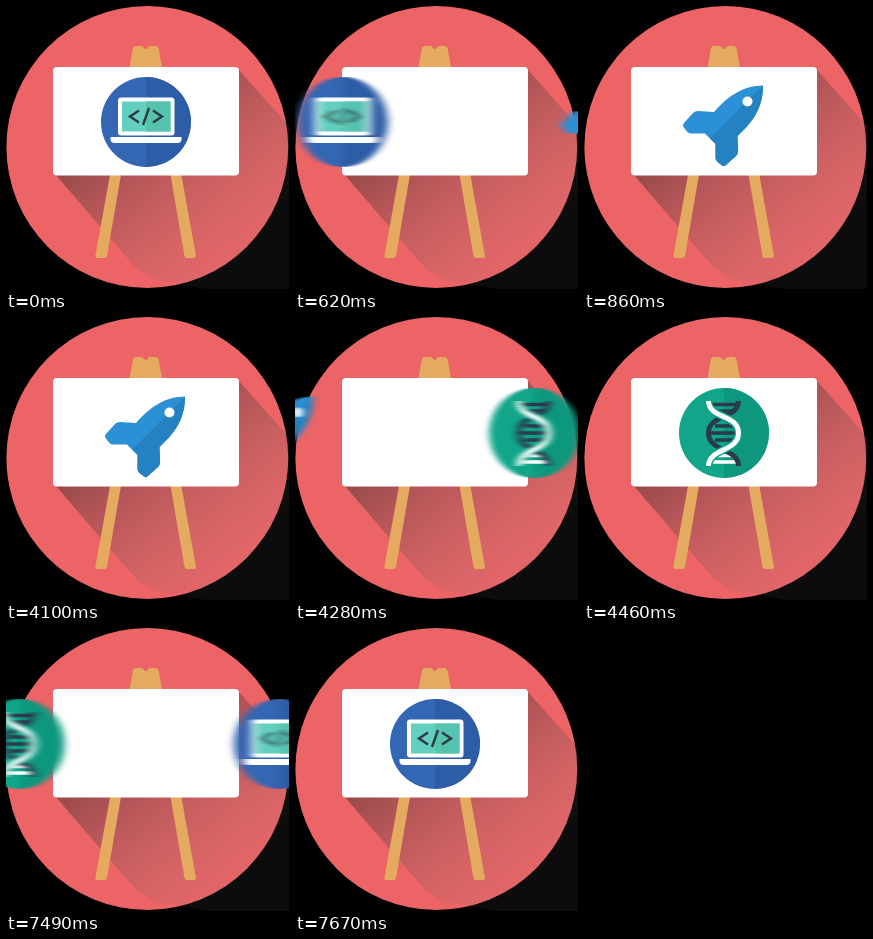
Recreate the animation shown at these times as an HTML page. Size 283 px wide and 283 px high, loop 7.7 s.

```html
<!DOCTYPE html>
<html lang="en">
<head>
<meta charset="utf-8">
<title>Easel slides</title>
<style>
  html, body { margin: 0; width: 100%; height: 100%; overflow: hidden; background: #000; }
  svg { display: block; width: 100vw; height: 100vh; }
</style>
</head>
<body>
<svg viewBox="0 0 283 283">
  <defs>
    <linearGradient id="fade" gradientUnits="userSpaceOnUse" x1="120" y1="110" x2="227" y2="242">
      <stop offset="0" stop-color="#302828" stop-opacity=".46"/>
      <stop offset=".35" stop-color="#4a3c3e" stop-opacity=".32"/>
      <stop offset="1" stop-color="#807476" stop-opacity=".1"/>
    </linearGradient>
    <filter id="blur" filterUnits="userSpaceOnUse" x="40" y="60" width="200" height="112" color-interpolation-filters="sRGB">
      <feGaussianBlur id="smear" stdDeviation="0 0"/>
    </filter>
    <path id="half" d="M140 71a45 45 0 0 1 0 90z"/>
    <path id="strand" d="M124.500 84C124.500 102 154.500 97 154.500 116S124.500 131 124.500 149"/>
  </defs>

  <circle cx="141.300" cy="141" r="140.900" fill="#ec6466"/>
  <path d="M232 63L283 120V283H200L165 276Q140 274 124 255L49 168Z" fill="url(#fade)"/>
  <path d="M127 42Q128 40 130 40H135Q137 40 138 42Q139.500 44 141.500 42Q142.500 40 144.500 40H149.500Q151.500 40 152.500 42L190 250Q190 252 188 252H181Q179 252 178.500 250L163 160H116.500L101 250Q100.500 252 98.500 252H91Q89 252 89.500 249Z" fill="#e4aa60"/>
  <rect x="47" y="61" width="186" height="108.500" rx="4" fill="#fff"/>

  <g class="slide">
    <circle cx="140" cy="116" r="45" fill="#3366b3"/>
    <use href="#half" fill="#2e5da7"/>
    <rect x="112" y="91.500" width="56.500" height="38" rx="3" fill="#fff"/>
    <path d="M104.500 131H175.500V133Q175.500 137 171.500 137H108.500Q104.500 137 104.500 133Z" fill="#fff"/>
    <path d="M116 95.500H164.500V125.500H116Z" fill="#62d0bc"/>
    <path d="M140 95.500H164.500V125.500H140Z" fill="#56c3af"/>
    <path d="M133 104.500L124 110.500L133 116.500M147 104.500L156 110.500L147 116.500M143 102L137 119" fill="none" stroke="#2b3a45" stroke-width="2.400"/>
  </g>

  <g class="slide">
    <path d="M179 79.500C160 80 146 88 130 106L114 105Q111 105 109 107L100 117Q98 119 99.500 121L103 125.500Q104.500 127.500 107 127.500H121L131.500 138V152Q131.500 154.500 133.500 156L138 159.500Q140 161 142 159L152 150Q154 148 154 145L153.500 130C171 114 179 100 179 79.500Z" fill="#2b90d5"/>
    <path d="M179 79.500L126 132.500L131.500 138V152Q131.500 154.500 133.500 156L138 159.500Q140 161 142 159L152 150Q154 148 154 145L153.500 130C171 114 179 100 179 79.500Z" fill="#2582c2"/>
    <circle cx="163.500" cy="95.500" r="5" fill="#fff"/>
  </g>

  <g class="slide" fill="none" stroke-width="5">
    <circle cx="140" cy="116" r="45" fill="#11a68a"/>
    <use href="#half" fill="#0d987e"/>
    <g stroke="#2b394c" stroke-width="3.500">
      <path d="M127 87.500H152M131 94H148M131 109H149M127 116H153M131 123H149"/>
      <path d="M131 138.500H148M127 145H152" stroke="#fff"/>
    </g>
    <use href="#strand" transform="matrix(-1 0 0 1 279 0)" stroke="#2b394c"/>
    <use href="#strand" stroke="#0f9f84" stroke-width="8"/>
    <use href="#strand" stroke="#fff"/>
  </g>
</svg>
<script>
  const LOOP = 7700, STEP = 30, MOVE = 330, SPACING = 260;
  const starts = [500, 4100, 7340];
  const slides = [...document.querySelectorAll('.slide')];
  const smear = document.getElementById('smear');

  function ease(ms) {
    const u = Math.min(1, Math.max(0, ms / MOVE)) ** 0.9;
    return u * u * (3 - 2 * u);
  }

  function place(slide, x, blur) {
    slide.style.display = '';
    slide.setAttribute('transform', `translate(${x} 0)`);
    if (blur) slide.setAttribute('filter', 'url(#blur)');
    else slide.removeAttribute('filter');
  }

  function draw(now) {
    const t = now % LOOP;
    const passed = starts.filter(s => t >= s).length;
    const elapsed = passed ? Math.floor((t - starts[passed - 1]) / STEP) * STEP : MOVE;
    const p = ease(elapsed);
    const moving = p > 0 && p < 1;
    const speed = (ease(elapsed + STEP / 2) - ease(elapsed - STEP / 2)) * SPACING;

    slides.forEach(s => s.style.display = 'none');
    smear.setAttribute('stdDeviation', `${speed * 0.12} 0`);
    place(slides[passed % 3], (1 - p) * SPACING, moving);
    if (p < 1) place(slides[(passed + 2) % 3], -p * SPACING, moving);
    requestAnimationFrame(draw);
  }
  requestAnimationFrame(draw);
</script>
</body>
</html>
```
